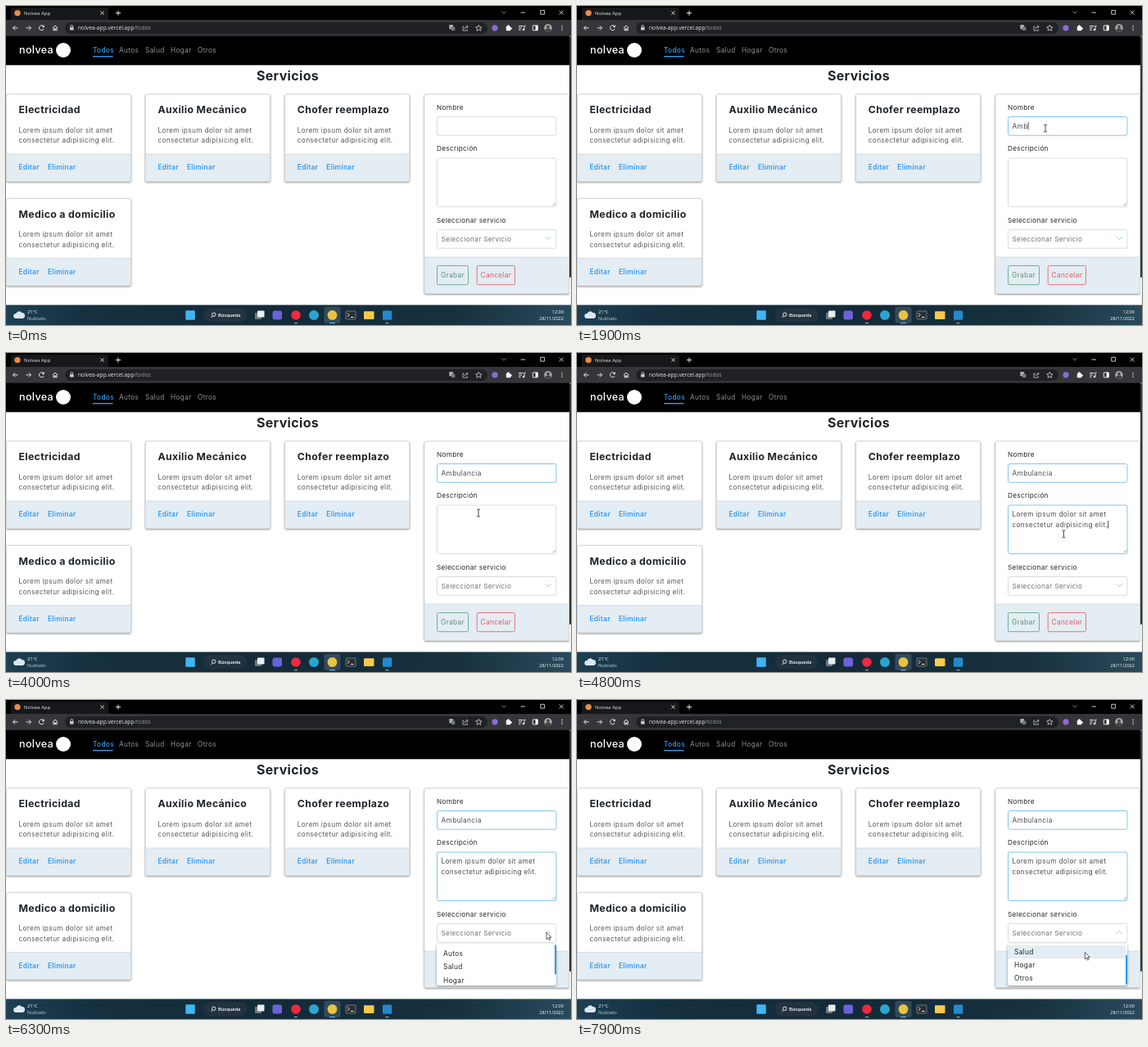
Write an HTML page that moves like this. It is 690 px wide and 390 px high and loops after 8 s.

```html
<!DOCTYPE html>
<html lang="es">
<head>
<meta charset="utf-8">
<title>Servicios</title>
<style>
html, body { margin: 0; width: 100%; height: 100%; overflow: hidden; background: #fff; }
svg { display: block; width: 690px; height: 390px; }
.page { font-family: Inter, sans-serif; letter-spacing: .02em; }
.os { font-family: "Open Sans", sans-serif; }
.card { filter: drop-shadow(0 1.3px .8px rgba(0,0,0,.42)); }
.panel { filter: drop-shadow(0 1.5px 1.5px rgba(0,0,0,.4)); }
.line { fill: none; stroke: #e8eaed; stroke-width: 1; }
text { white-space: pre; }
</style>
</head>
<body>
<svg id="stage" viewBox="0 0 690 390">
  <defs>
    <linearGradient id="sky">
      <stop offset="0" stop-color="#1d4053"/><stop offset=".15" stop-color="#15303f"/>
      <stop offset=".5" stop-color="#142a38"/><stop offset=".8" stop-color="#17313f"/>
      <stop offset="1" stop-color="#2a4a5b"/>
    </linearGradient>
    <clipPath id="listClip"><rect x="526" y="298.5" width="146" height="50.5" rx="2"/></clipPath>
  </defs>
  <g id="page" class="page"></g>
  <g id="os" class="os"></g>
  <g id="pointer">
    <path id="arrow" d="M0 0V8.6L2 6.8L3.3 9.8L4.6 9.2L3.3 6.3H6Z" fill="#fff" stroke="#222" stroke-width=".7"/>
    <path id="beam" d="M-2-4.5Q0-4.5 0-3.5Q0-4.5 2-4.5M0-3.5V3.5M-2 4.5Q0 4.5 0 3.5Q0 4.5 2 4.5" fill="none" stroke="#333" stroke-width=".9"/>
  </g>
</svg>
<script>
const $ = id => document.getElementById(id);
const page = $('page'), os = $('os');
const BLUE = '#339af0', INK = '#212529', GREY = '#55595d', EDGE = '#d3d7da', TINT = '#e3edf3';

function add(parent, tag, attrs, str) {
  const el = document.createElementNS('http://www.w3.org/2000/svg', tag);
  for (const k in attrs) el.setAttribute(k, attrs[k]);
  if (str !== undefined) el.textContent = str;
  parent.append(el);
  return el;
}
const text = (g, x, y, str, size, fill = INK, weight = 400, anchor = 'start') =>
  add(g, 'text', { x, y, 'font-size': size, fill, 'font-weight': weight, 'text-anchor': anchor }, str);
const rect = (g, x, y, width, height, fill, rx = 0, stroke = 'none') =>
  add(g, 'rect', { x, y, width, height, fill, rx, stroke, 'stroke-width': .85 });
const dot = (g, cx, cy, r, fill) => add(g, 'circle', { cx, cy, r, fill });
const line = (g, d, extra) => add(g, 'path', { d, class: 'line', ...extra });

// Page header
rect(page, 0, 36, 690, 36.3, '#000');
text(page, 16, 58.2, 'nolvea', 12.6, '#fff', 500);
dot(page, 70, 54, 9, '#fff');
[[106, 'Todos'], [138, 'Autos'], [170, 'Salud'], [201, 'Hogar'], [234, 'Otros']].forEach(([x, s], i) =>
  text(page, x, 57, s, 8.3, i ? '#8f9193' : BLUE, i ? 400 : 500));
rect(page, 106, 61, 24.5, 1.4, BLUE);
text(page, 344, 91, 'Servicios', 16, INK, 700, 'middle');

// Cards
function box(x, y, w, h, foot) {
  const g = add(page, 'g', { class: 'card' });
  rect(g, x, y, w, h, '#fff', 2);
  rect(g, x, foot, w, y + h - foot, TINT, 1);
  line(g, `M${x} ${foot}h${w}`, { style: 'stroke:#ccd3d7;stroke-width:.7' });
  rect(g, x, y, w, h, 'none', 2, EDGE);
}
function card(x, y, title) {
  box(x + .4, y + .4, 152, 106.5, y + 73.5);
  text(page, x + 15.5, y + 23.5, title, 12.3, INK, 700);
  text(page, x + 15.5, y + 47.3, 'Lorem ipsum dolor sit amet', 8.3, GREY);
  text(page, x + 15.5, y + 59.7, 'consectetur adipisicing elit.', 8.3, GREY);
  text(page, x + 15.5, y + 92.5, 'Editar', 8.3, BLUE, 600);
  text(page, x + 51, y + 92.5, 'Eliminar', 8.3, BLUE, 600);
}
card(0, 107.5, 'Electricidad');
card(170, 107.5, 'Auxilio Mecánico');
card(340.3, 107.5, 'Chofer reemplazo');
card(0, 235, 'Medico a domicilio');

// Form
box(511, 108, 176.5, 243.5, 307);
text(page, 526, 126.5, 'Nombre', 8.2);
text(page, 526, 177.2, 'Descripción', 8.2);
text(page, 526, 264.5, 'Seleccionar servicio', 8.2);
const nameBox = rect(page, 526.5, 135.5, 145.5, 22.7, '#fff', 2, EDGE);
const noteBox = rect(page, 526.5, 186, 145.5, 59.5, '#fff', 2, EDGE);
rect(page, 526.5, 273.5, 145.5, 22.7, '#fff', 2, EDGE);
line(page, 'M667.5 244L671 240.5M669.5 244L671 242.5', { style: 'stroke:#777;stroke-width:.6' });
const nameText = text(page, 531.5, 149.6, '', 8.3, '#4a4f54');
const noteTexts = ['Lorem ipsum dolor sit amet', 'consectetur adipisicing elit.'].map((s, i) =>
  text(page, 531.5, 200.2 + i * 12.4, s, 8.3, '#4a4f54'));
text(page, 531.5, 287.6, 'Seleccionar Servicio', 8.2, '#6c7075');
const chevron = line(page, 'M-3.2-1.6L0 1.6L3.2-1.6', { style: 'stroke:#94cbec' });
const caret = rect(page, 0, 0, .8, 9.5, '#222');
for (const [x, w, s, edge, ink] of [
  [526.5, 38, 'Grabar', '#5da382', '#5f9079'], [575.2, 46.3, 'Cancelar', '#e4626c', '#dc5a63']]) {
  rect(page, x, 317.5, w, 23.2, 'none', 2, edge);
  text(page, x + w / 2, 332, s, 8.3, ink, 400, 'middle');
}

// Options panel
const panel = add(page, 'g', { class: 'panel' });
rect(panel, 526, 298, 146, 51, '#fff', 2);
const clip = add(panel, 'g', { 'clip-path': 'url(#listClip)' });
const hover = rect(clip, 526, 0, 144, 16.2, TINT);
const options = add(clip, 'g', {});
['Autos', 'Salud', 'Hogar', 'Otros'].forEach((s, i) =>
  text(options, 534, 313 + i * 16.3, s, 8.3));
const thumb = rect(clip, 670, 299, 2, 36.5, BLUE, 1);

// Page scrollbar
rect(page, 688, 36, 2, 329, '#f4f4f4');
rect(page, 688, 37, 2, 295, '#30343a', 1);

// Browser frame
rect(os, 0, 0, 690, 18, '#000');
add(os, 'path', { d: 'M3 18Q6 18 6 14V5Q6 2 9 2H122Q125 2 125 5V14Q125 18 128 18Z', fill: '#17181a' });
rect(os, 0, 17, 690, 19.7, '#35363a');
dot(os, 14, 8.6, 3.7, '#e88b4a');
text(os, 22, 10.8, 'Nolvea App', 6, '#e8eaed');
line(os, 'M115.5 6.5l4 4m0-4l-4 4');
line(os, 'M134 8.6h6m-3-3v6');
line(os, 'M605.5 6.5l2.5 2.5l2.5-2.5', { opacity: .5 });
line(os, 'M628.5 8h5.5M652.8 5.3h4.8v4.8h-4.8zM675.8 5.5l5 5m0-5l-5 5', { opacity: .85 });
line(os, 'M14.5 26.8h-6m2.7-2.7l-2.7 2.7l2.7 2.7M46 25a3 3 0 1 0 .2 3M46.3 23.5v2.2h-2.2M57 26.8l3-2.8l3 2.8M58 26.5v3.3h1.4v-2h1.3v2h1.4v-3.3');
line(os, 'M24.5 26.8h6m-2.7-2.7l2.7 2.7l-2.7 2.7', { opacity: .9 });
rect(os, 72, 20, 516, 14, '#202124', 7);
rect(os, 78, 26, 4.6, 3.6, '#c8cacd', .6);
line(os, 'M79 26v-1.2a1.3 1.3 0 0 1 2.6 0v1.2', { opacity: .8 });
const url = text(os, 88, 29.1, 'nolvea-app.vercel.app', 6.7, '#e8eaed');
add(url, 'tspan', { fill: '#9aa0a6' }, '/todos');
rect(os, 541.3, 23, 4.8, 5.2, '#a9acb0', .6);
rect(os, 544, 25.5, 4.3, 4.6, '#777b80', .6);
line(os, 'M559.5 25h-1.5v5h5.5v-1.5M560 28q.5-2.7 4-2.7m-1.6-1.7l1.8 1.7l-1.8 1.7', { opacity: .7, 'stroke-width': .8 });
line(os, 'M577.3 23.3l1.1 2.4l2.6.2l-2 1.7l.7 2.6l-2.4-1.4l-2.3 1.4l.6-2.6l-2-1.7l2.6-.2z', { opacity: .7 });
dot(os, 597, 26.8, 3.6, '#8c6bd6');
rect(os, 610.8, 24.8, 5.4, 5.4, '#fff', .8);
dot(os, 613.4, 24.5, 1.3, '#fff');
dot(os, 616.5, 27.5, 1.3, '#fff');
line(os, 'M626 24.5h5.5m-5.5 2.4h4m-4 2.4h2.6M633 29v-4.8h1.6');
dot(os, 632, 29, 1.2, '#fff');
rect(os, 643.3, 23.8, 6, 6, 'none', .5, '#fff');
rect(os, 646.6, 23.8, 2.7, 6, '#fff');
dot(os, 662, 26.8, 4.8, '#a9a6a4');
dot(os, 662, 25.4, 1.8, '#45403f');
add(os, 'path', { d: 'M658.4 30q.4-2.7 3.6-2.7t3.6 2.7q-3.6 3-7.2 0', fill: '#45403f' });
[24.3, 26.8, 29.3].forEach(y => dot(os, 679, y, .75, '#e8eaed'));

// Taskbar
rect(os, 0, 365.5, 690, 24.5, 'url(#sky)');
add(os, 'path', { d: 'M12 382a3 3 0 0 1 .3-6a4 4 0 0 1 7-1a3.4 3.4 0 0 1 .4 7z', fill: '#dbe7f3' });
text(os, 26, 376.4, '21°C', 5.8, '#fff');
text(os, 26, 384.2, 'Nublado', 5.7, '#c3ccd2');
rect(os, 219.3, 372.3, 11.5, 11.5, '#3fb5f2', .8);
rect(os, 241.5, 369.5, 53, 17, '#22333f', 8.5);
line(os, 'M250.4 381l2-2');
add(os, 'circle', { cx: 253.8, cy: 377.2, r: 2.2, class: 'line' });
text(os, 259, 380.3, 'Búsqueda', 5.7, '#fff', 600);
rect(os, 304, 375, 8, 8, '#6f787e', .8);
rect(os, 307, 372.5, 8.5, 8, '#e9ecee', .8);
rect(os, 325.5, 372.5, 11.5, 11, '#6a63d8', 2.5);
dot(os, 354, 378, 5.8, '#f0293e');
dot(os, 376, 378, 6, '#2aa5cf');
rect(os, 388.5, 367.8, 20, 20, '#34495a', 2);
dot(os, 398.5, 378, 5.9, '#e8c443');
rect(os, 415, 373, 12, 10, '#2b2f33', 1, '#7b8288');
line(os, 'M417 375.5l2.2 2.2l-2.2 2.2M421 380.5h3.5');
rect(os, 437, 373.2, 12.5, 9.8, '#f8c94c', 1);
rect(os, 460, 372.5, 11.3, 11.3, '#2489ca', 1.5);
[[352, 4, '#9aa5ad'], [395, 7, '#58b4f5'], [463.5, 4, '#9aa5ad']].forEach(([x, w, c]) => rect(os, x, 387, w, 1.3, c, .6));
text(os, 681, 376.2, '12:00', 5.6, '#fff', 400, 'end');
text(os, 681, 384, '28/11/2022', 5.6, '#fff', 400, 'end');

// Motion: pointer stops as [ms, x, y], key presses in ms
const stops = [[100, 640, 392], [900, 572, 149.5], [3500, 572, 149.5], [4000, 577, 195.5],
  [4500, 577, 195.5], [5300, 632, 277], [5600, 648, 293], [6000, 660, 284], [6300, 660, 284],
  [6900, 621.6, 308], [7600, 621.6, 308], [7900, 620.3, 308.3]];
const keys = [1500, 1800, 1900, 2000, 2200, 2400, 2500, 2700, 3000, 3300];
const ramp = (t, a, b) => Math.min(1, Math.max(0, (t - a) / (b - a)));
const ease = p => p * p * (3 - 2 * p);
const show = (el, on) => el.setAttribute('visibility', on ? 'inherit' : 'hidden');
const put = (el, x, y, more = '') => el.setAttribute('transform', `translate(${x} ${y})${more}`);
const focusColor = p => `rgb(${[[211, 110], [215, 187], [218, 234]].map(([a, b]) => a + (b - a) * p)})`;

function pointerAt(t) {
  let [, x, y] = stops[0];
  for (let i = 1; i < stops.length; i++) {
    const [a, x0, y0] = stops[i - 1], [b, x1, y1] = stops[i];
    if (t < a) break;
    const p = ease(ramp(t, a, b));
    x = x0 + (x1 - x0) * p;
    y = y0 + (y1 - y0) * p;
  }
  return [x, y];
}

function draw(t) {
  const [x, y] = pointerAt(t);
  const overText = x > 526 && x < 672 && (y > 135 && y < 159 || y > 186 && y < 246);
  put($('pointer'), x, y);
  show($('pointer'), t >= 100);
  show($('beam'), overText);
  show($('arrow'), !overText);

  nameBox.setAttribute('stroke', focusColor(ramp(t, 900, 1100)));
  noteBox.setAttribute('stroke', focusColor(ramp(t, 4000, 4100)));
  nameText.textContent = 'Ambulancia'.slice(0, keys.filter(k => t >= k).length);
  const pasted = t >= 4500;
  noteTexts.forEach(el => show(el, pasted));

  const inName = t < 4000;
  const end = inName ? nameText : noteTexts[1];
  const width = inName || pasted ? end.getComputedTextLength() : 0;
  put(caret, 531.6 + width, inName ? 142 : pasted ? 205 : 192.6);
  show(caret, t >= 1000 && t < 1300 || t >= 1500 && t < 3600 || t >= 4100 && t < 5000);

  const open = t >= 6300;
  put(chevron, 662.3, 284, open ? ' scale(1 -1)' : '');
  show(panel, open);
  const s = ease(ramp(t, 7600, 7900));
  put(options, 0, -18.4 * s);
  const row = s > .5 ? 1 : 0;
  show(hover, t >= 6500);
  put(hover, 0, 302 + row * 16.3 - 18.4 * s);
  put(thumb, 0, 12.5 * s);
}

function tick(now) {
  draw(Math.floor(now % 8000 / 100) * 100);
  requestAnimationFrame(tick);
}
draw(0);
requestAnimationFrame(tick);
</script>
</body>
</html>
```
